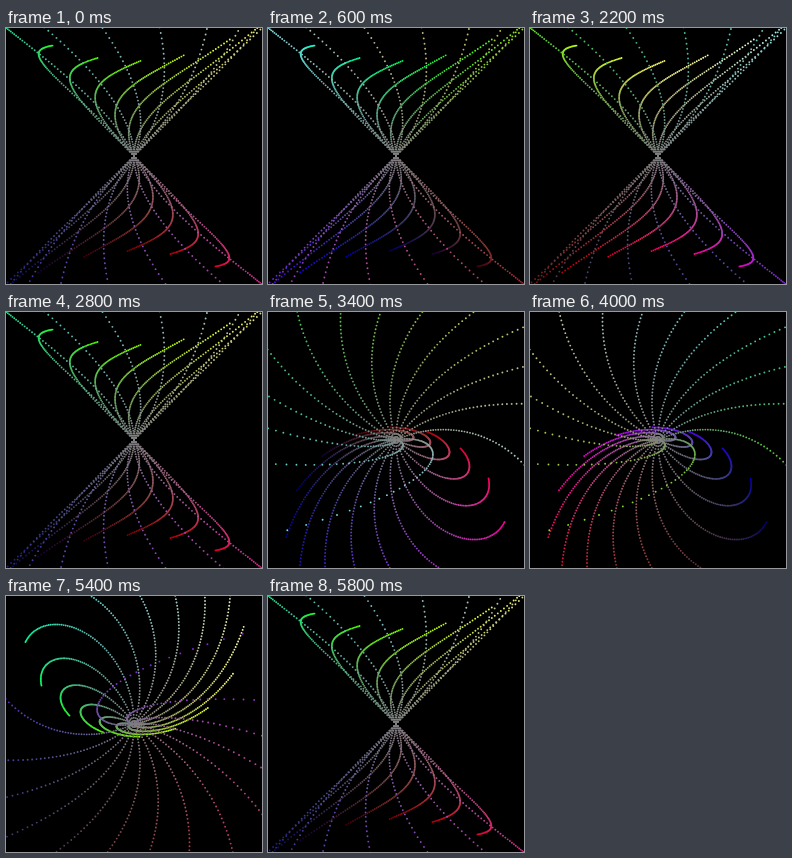
An HTML page with a canvas for the animation above (6000 ms loop, 256 by 256 pixels).

```html
<!DOCTYPE html>
<html>
<head>
<meta charset="utf-8">
<style>
html, body { margin: 0; height: 100%; overflow: hidden; background: #000; }
canvas { display: block; }
</style>
</head>
<body>
<canvas id="stage" width="256" height="256"></canvas>
<script>
const ctx = document.getElementById('stage').getContext('2d');
const TAU = 2 * Math.PI;
const ARMS = 14, STEPS = 75, TWIST = 0.225 * TAU;
const DISTANCE = 4 / 3, FOCAL = 128 / Math.tan(Math.PI / 6);
const DOT = 0.95;

// Twisted double cone; colour follows position inside the RGB cube.
const points = [];
for (let arm = 0; arm < ARMS; arm++) {
  for (let i = -STEPS; i <= STEPS; i++) {
    const t = i / STEPS;
    const angle = arm * TAU / ARMS + TWIST * t;
    const pos = [t * Math.sin(angle), t, -t * Math.cos(angle)];
    const rgb = pos.map(v => Math.round(127.5 * (1 + v)));
    points.push({ pos, color: `rgb(${rgb})` });
  }
}

const dot = (a, b) => a[0] * b[0] + a[1] * b[1] + a[2] * b[2];

// The camera always keeps the y axis upward.
function draw(eye) {
  const [ex, ey, ez] = eye;
  const flat = Math.hypot(ex, ez);
  const right = [ez / flat, 0, -ex / flat];
  const up = [-ey * ex / flat, flat, -ey * ez / flat];
  ctx.fillStyle = '#000';
  ctx.fillRect(0, 0, 256, 256);
  points
    .map(p => ({ p, depth: DISTANCE - dot(p.pos, eye) }))
    .filter(q => q.depth > 0.01)
    .sort((a, b) => b.depth - a.depth)
    .forEach(({ p, depth }) => {
      const k = FOCAL / depth;
      ctx.fillStyle = p.color;
      ctx.beginPath();
      ctx.arc(128 + k * dot(p.pos, right), 128 - k * dot(p.pos, up), DOT, 0, TAU);
      ctx.fill();
    });
}

// One orbit around the vertical axis, then one over the poles.
let shown = -1;
function tick(now) {
  const step = Math.floor(now % 6000 / 200);
  if (step !== shown) {
    shown = step;
    const a = step % 15 / 14 * TAU;
    const s = Math.sin(a), c = Math.cos(a);
    draw(step < 15 ? [s, 0, c] : [0, s, c]);
  }
  requestAnimationFrame(tick);
}
tick(performance.now());
</script>
</body>
</html>
```
